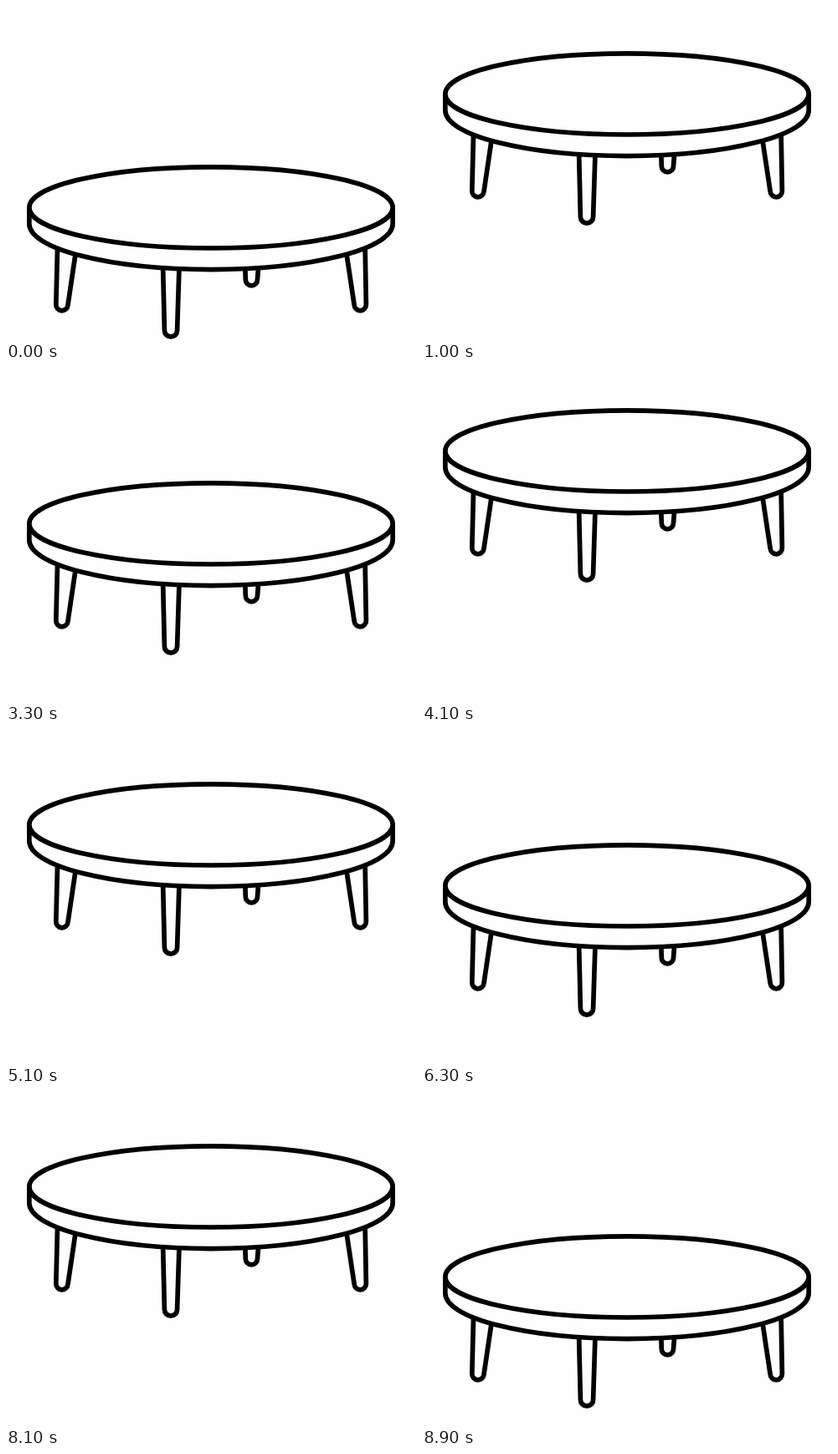
Recreate the animation shown at these times as an HTML page. Size 490 by 400 pixels, loop 9000 ms.

```html
<!DOCTYPE html>
<html lang="en">
<head>
<meta charset="utf-8">
<title>Bouncing table</title>
<style>
  html, body { margin: 0; width: 100%; height: 100%; overflow: hidden; background: #fefefe; }
  svg { display: block; }
</style>
</head>
<body>
<svg width="490" height="400" viewBox="0 0 490 400">
  <g id="table" fill="#fefefe" stroke="#000" stroke-width="5.7">
    <!-- legs -->
    <path d="M62 270L59.8 357.4a7.1 7.1 0 0 0 14.2 0.6L87 270"/>
    <path d="M187.3 300L189.4 388.5a7.6 7.6 0 0 0 15.2 0L207.4 300"/>
    <path d="M285.4 300L286.3 327.7a7.1 7.1 0 0 0 14.2 0L302.6 300"/>
    <path d="M403 270L416.2 358a7.1 7.1 0 0 0 14.2 -0.6L428.8 270"/>
    <!-- rim and top -->
    <path d="M27.8 241.4V261a217.2 54.6 0 0 0 434.4 0V241.4"/>
    <ellipse cx="245" cy="241.4" rx="217.2" ry="48.6"/>
  </g>
</svg>
<script>
  const table = document.getElementById('table');
  const PERIOD = 3000, STEP = 100, HEIGHT = 152;

  // Gravity arc: on the floor at 0, at the apex halfway, in whole pixels.
  function draw() {
    const t = Math.floor(performance.now() / STEP) * STEP % PERIOD;
    const u = 2 * t / PERIOD - 1;
    const y = Math.floor(HEIGHT * u * u) - HEIGHT;
    table.setAttribute('transform', `translate(0 ${y})`);
    requestAnimationFrame(draw);
  }
  draw();
</script>
</body>
</html>
```
